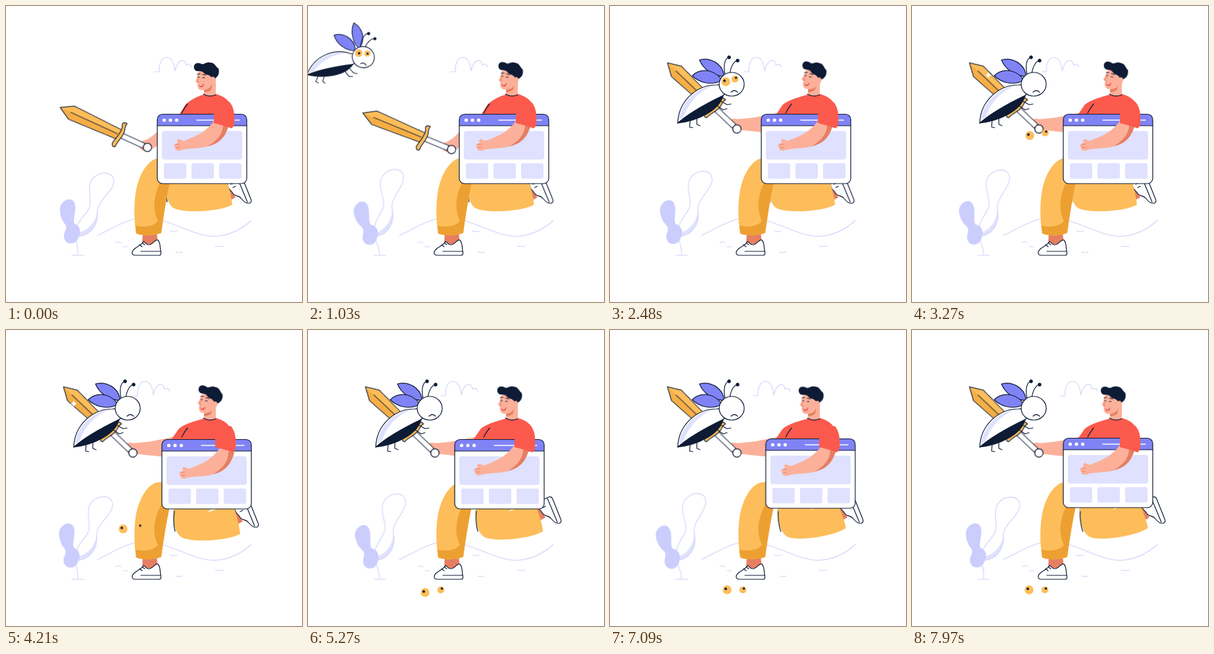
Recreate the animation shown at these times as an HTML page without scripts. Size 450 by 450 pixels, loop 8 s.

```html
<!DOCTYPE html>
<html lang="en">
<head>
<meta charset="utf-8">
<title>Bug hunter</title>
<style>
html, body { margin: 0; width: 100%; height: 100%; overflow: hidden; background: #fff; }
svg { display: block; width: 100vw; height: 100vh; }
g, path { transform-box: view-box; }

.ink { stroke: #0d1b35; stroke-width: 1.2; stroke-linecap: round; stroke-linejoin: round; }
.line { fill: none; }
.pale { fill: none; stroke: #d0d2f9; stroke-width: 1.1; stroke-linecap: round; }
.navy { fill: #0d1b35; }
.white { fill: #fff; }
.skin { fill: #fcb09a; }
.shade { fill: #e67e62; }
.red { fill: #fb5a4d; }
.gold { fill: #fdbd5a; }
.amber { fill: #eda032; }
.edge { fill: #f5ae45; }
.violet { fill: #8083f5; }
.tint { fill: #dfe1fe; }

.cloud, .bug, .wing, .stare, .sword, .arm, .torso, .head, .win, .reach, .sleeve,
.thigh, .shoe, .glint, .eye1, .eye2 { animation: 8s linear infinite; }
.head, .win, .reach, .sleeve, .thigh, .shoe { animation-timing-function: ease-in-out; }

/* plant and cloud */
.leaf, .frond { animation: 1s cubic-bezier(.37,0,.63,1) infinite alternate; transform-origin: 107px 378px; }
.leaf { animation-name: leaf; }
.frond { animation-name: frond; }
@keyframes leaf { to { transform: rotate(-10.8deg); } }
@keyframes frond { to { transform: rotate(-9.4deg); } }
.cloud { animation-name: cloud; }
@keyframes cloud {
  0%, 100% { transform: translate(226px, 100px); }
  50% { transform: translate(191px, 100px); }
}

/* bug */
.bug { animation-name: bug; }
@keyframes bug {
  0%, 2% { transform: translate(-45px, 84px) rotate(19deg) scale(.89); }
  10.6% { transform: translate(68px, 80px) rotate(17deg) scale(.89); }
  16% { transform: translate(104px, 74px) rotate(20deg) scale(.89); }
  20.5% { transform: translate(128px, 73px) rotate(18deg) scale(.89); }
  23.9% { transform: translate(141px, 77px) rotate(19deg) scale(.89); }
  26% { transform: translate(150px, 78px) rotate(16deg) scale(.92); }
  30%, 100% { transform: translate(184px, 119px); }
}
.wing { animation-name: flap; transform-origin: -12px -12px; }
@keyframes flap {
  0%, 5%, 10%, 15%, 20%, 25% { transform: rotate(0); }
  2.5%, 7.5%, 12.5%, 17.5%, 22.5%, 27% { transform: rotate(var(--open)); }
  23.9% { transform: rotate(calc(var(--open) * .85)); }
  30%, 100% { transform: rotate(0); }
}
.stare { animation-name: stare; animation-timing-function: step-end; }
@keyframes stare { 0% { opacity: 1; } 31%, 100% { opacity: 0; } }

.eye1 { animation-name: eye1; }
.eye2 { animation-name: eye2; }
@keyframes eye1 {
  0%, 30.99% { opacity: 0; transform: translate(176px, 115px); }
  31% { opacity: 1; transform: translate(176px, 115px); }
  40.9% { transform: translate(179px, 197px); }
  52.6% { transform: translate(178px, 302px); }
  61.4% { transform: translate(178px, 386px); }
  63.2% { transform: translate(178px, 403px); }
  65.9% { transform: translate(178px, 399px); }
  69%, 100% { opacity: 1; transform: translate(178px, 395px); }
}
@keyframes eye2 {
  0%, 30.99% { opacity: 0; transform: translate(190px, 111px); }
  31% { opacity: 1; transform: translate(190px, 111px); }
  40.9% { transform: translate(202.5px, 193px); }
  52.6% { transform: translate(202.5px, 299px); }
  61.4% { transform: translate(202px, 382px); }
  63.4% { transform: translate(202px, 400px); }
  65.9%, 100% { opacity: 1; transform: translate(202px, 395px); }
}

/* sword and its arm */
.sword { animation-name: sword; }
@keyframes sword {
  0% { transform: translate(215px, 215px) rotate(24.6deg); }
  23.9%, 25% { transform: translate(221px, 221px) rotate(20.5deg); animation-timing-function: ease-in-out; }
  30%, 100% { transform: translate(193px, 187px) rotate(43.6deg); }
}
.glint { animation-name: glint; }
@keyframes glint {
  0%, 37% { transform: translate(116px, 105px) scale(0); }
  40.9% { transform: translate(116px, 105px) scale(1); }
  45% { transform: translate(116px, 105px) scale(0); }
  48% { transform: translate(103px, 112px) scale(0); }
  52.6% { transform: translate(103px, 112px) scale(1); }
  57%, 100% { transform: translate(103px, 112px) scale(0); }
}
.arm { animation-name: arm; }
@keyframes arm {
  0% { d: path("M262 176L231 190C222 199 214 204 207 205C202 207 201 214 205 218C210 222 217 220 221 218L231 212L262 200Z"); }
  23.9%, 25% { d: path("M262 176L231 190C224 200 218 206 211 209C206 211 205 218 209 222C214 226 221 224 224 222L231 216L262 200Z"); animation-timing-function: ease-in-out; }
  30%, 100% { d: path("M258 162L232 167C220 170 206 171 194 172C184 169 178 175 181 180C183 186 188 189 194 188L232 192L258 192Z"); }
}
.torso { animation-name: torso; }
@keyframes torso {
  0%, 25% { d: path("M300 135C288 138 276 146 272 151L263 166L268 225L339 225L343 180C347 165 348 142 320 134Z"); }
  30%, 100% { d: path("M300 135C288 138 268 144 262 151L251 167L258 225L339 225L343 180C347 165 348 142 320 134Z"); }
}

/* hero */
.head { animation-name: head; transform-origin: 310px 132px; }
@keyframes head {
  0%, 5% { transform: rotate(0); }
  20%, 26% { transform: rotate(10deg); }
  40.9% { transform: rotate(8.5deg); }
  52.6% { transform: rotate(10deg); }
  65.9% { transform: rotate(3deg); }
  79% { transform: rotate(1.5deg); }
  100% { transform: rotate(2deg); }
}
.win { animation-name: win; }
@keyframes win {
  0%, 41% { transform: translate(0, 0); }
  53% { transform: translate(7px, 2px); animation-timing-function: ease-in; }
  65.9% { transform: translate(-7px, 2px); animation-timing-function: ease-out; }
  78.5% { transform: translate(-27.5px, -1px); }
  88% { transform: translate(7px, 1px); }
  93%, 100% { transform: translate(0, 0); }
}
.reach { animation-name: reach; }
@keyframes reach {
  0%, 41% { transform: translate(0, 0); }
  53% { transform: translate(8px, 6px); animation-timing-function: ease-in; }
  65.9% { transform: translate(-3px, 1px); animation-timing-function: ease-out; }
  78.5% { transform: translate(-10px, -7px); }
  88% { transform: translate(5px, 2px); }
  93%, 100% { transform: translate(0, 0); }
}
.sleeve { animation-name: sleeve; }
@keyframes sleeve {
  0%, 41% { transform: translate(0, 0); }
  53% { transform: translate(2px, 0); }
  65.9% { transform: translate(-2px, 0); }
  78.5% { transform: translate(-7px, 0); }
  88% { transform: translate(2px, 0); }
  93%, 100% { transform: translate(0, 0); }
}
.thigh { animation-name: thigh; transform-origin: 250px 270px; }
@keyframes thigh {
  0% { transform: translate(1px, 0) rotate(0); }
  41% { transform: translate(-1px, 0) rotate(0); }
  51% { transform: translate(13px, 8px) rotate(0); }
  65.9% { transform: translate(13px, 8px) rotate(-2.5deg); }
  78.5%, 100% { transform: translate(13px, 8px) rotate(-5.5deg); }
}
.shoe { animation-name: shoe; }
@keyframes shoe {
  0% { transform: translate(-12px, 6px); }
  41% { transform: translate(-14px, 6px); }
  52.6% { transform: translate(-1px, 6px); }
  57.5% { transform: translate(6px, 2px); }
  63%, 100% { transform: translate(0, 0); }
}
</style>
</head>
<body>
<svg viewBox="0 0 450 450" xmlns="http://www.w3.org/2000/svg">
  <!-- scenery -->
  <g class="pale">
    <path d="M139 349C166 336 186 322 210 322C250 322 285 352 320 350C345 348 362 336 373 326"/>
    <path d="M167 360q4-3 8 0M178 366h7M250 342q5 2 10 0M258 374q5 2 10 0M318 365q6 1.500 12 0M100 379h18"/>
    <path class="cloud" d="M0 0H7C6-12 11-22 18-22C27-22 30-10 31-1C33-12 39-19 44-17C47-16 47-14 48-10C52-13 55-11 56-7"/>
  </g>
  <g class="frond">
    <path class="tint" d="M107 350C125 352 141 335 139 312C136 328 128 340 107 346Z"/>
    <path class="pale" d="M105 350C125 352 141 335 139 312C139 295 164 282 164 266C163 252 145 251 134 260C123 270 128 285 128 300C128 316 106 322 105 350"/>
    <path class="pale" d="M109 378C110 366 107 357 104 345"/>
  </g>
  <g class="leaf">
    <path fill="#cbcdfd" d="M96 294C104 293 107 303 105 312C104 320 102 326 104 331C112 334 115 343 111 350C108 358 104 361 98 361C90 361 86 352 89 345C91 340 93 336 90 332C85 326 82 318 82 309C82 301 89 294 96 294Z"/>
  </g>

  <!-- legs -->
  <g class="shoe">
    <path class="shade" d="M338 264L352 270L361 285L350 291L340 287Z"/>
    <path class="white ink" d="M349 267C348 262 351 260 355 259L366 254C369 253 371 254 372 257L384 287C386 291 384 294 381 294C377 294 373 291 370 287C366 281 360 284 357 279C355 275 350 273 349 267Z"/>
    <path class="line ink" d="M364 256L379 292M354 265l4-2M357 270l4-2"/>
  </g>
  <g class="thigh">
    <path class="gold" d="M243 255C240 275 241 296 252 306C264 316 325 313 343 302C342 290 338 276 332 255Z"/>
    <path class="white" d="M292 270L304 261L326 257Z"/>
    <path class="line ink" d="M243 267C241 281 242 290 244 298"/>
  </g>
  <path class="shade" d="M208 343H229L231 362H207Z"/>
  <path class="white ink" d="M209 358C206 365 193 367 192 374C191 378 194 379 197 379H233C236 379 236 375 235 372C234 366 235 360 231 356C227 353 224 363 217 363C213 363 212 359 209 358Z"/>
  <path class="line ink" d="M205 373H235M203 363l4 3M207 360l4 3"/>
  <path class="gold" d="M228 232C212 238 201 260 197 285C194 305 195 330 198 346C210 350 226 349 236 345C238 325 243 295 249 268L300 240L290 225Z"/>
  <path class="amber" d="M249 262V268C243 295 239 325 236 345C226 349 210 350 198 346L197 334C210 337 226 335 231 326C222 310 224 285 238 262Z"/>

  <!-- body and sword -->
  <path class="arm skin" d="M262 176L231 190C222 199 214 204 207 205C202 207 201 214 205 218C210 222 217 220 221 218L231 212L262 200Z"/>
  <path class="torso red" d="M300 135C288 138 276 146 272 151L263 166L268 225L339 225L343 180C347 165 348 142 320 134Z"/>
  <path class="line ink" d="M276 149Q271 155 267 163"/>
  <g class="sword">
    <path class="gold" d="M-146 0L-127-11L-46-8V0Z"/>
    <path class="edge" d="M-146 0L-127 11L-46 8V0Z"/>
    <path class="line ink" d="M-46-8L-127-11L-146 0L-127 11L-46 8M-128 0H-50"/>
    <path class="white ink" d="M-44-4H-6V4H-44Z"/>
    <path class="gold ink" d="M-43-20C-49-21-51-17-48-13C-45-5-49 5-51 14C-52 19-48 22-45 19C-46 10-40 2-42-8C-43-13-45-16-43-20Z"/>
    <circle class="white ink" r="6.300"/>
  </g>
  <path class="glint white" d="M0-5Q1-1 5 0Q1 1 0 5Q-1 1-5 0Q-1-1 0-5Z"/>

  <!-- browser window -->
  <g class="win">
    <rect class="white" x="230" y="164.500" width="136" height="105.500" rx="8"/>
    <path class="violet" d="M230 182V172.500Q230 164.500 238 164.500H358Q366 164.500 366 172.500V182Z"/>
    <path class="line ink" d="M230 182H366"/>
    <rect class="line ink" x="230" y="164.500" width="136" height="105.500" rx="8"/>
    <g class="white">
      <circle cx="240.500" cy="173.500" r="2.600"/><circle cx="250" cy="173.500" r="2.600"/><circle cx="259.500" cy="173.500" r="2.600"/>
    </g>
    <path stroke="#fff" stroke-width="1.300" stroke-linecap="round" d="M290 173.500H355"/>
    <g class="tint">
      <rect x="237" y="190" width="122" height="43.500" rx="4"/>
      <rect x="240" y="239" width="34" height="23.500" rx="3"/>
      <rect x="282" y="239" width="34" height="23.500" rx="3"/>
      <rect x="324" y="239" width="34" height="23.500" rx="3"/>
    </g>
  </g>
  <g class="reach">
    <path class="skin" d="M318 172C305 192 288 198 273 204C268 207 264 200 261 203C258 206 264 209 259 209C255 210 254 213 257 215C257 220 262 221 267 219C275 216 290 217 300 215C320 211 333 203 339 180Z"/>
    <path class="shade" d="M306 213.500C321 210 333 203 339 180L330 178C331 194 321 205 306 213.500Z"/>
    <path class="line" stroke="#e67e62" d="M258 210h6M258 215h6"/>
  </g>
  <path class="sleeve red" d="M316 156V178C325 180 335 183 343 186Q346 184 347 179C348 165 347 155 340 146L320 148Z"/>

  <!-- head -->
  <path class="skin" d="M301 118V134Q310 139 319 134V108Z"/>
  <path class="shade" d="M301 127Q309 126 314 118L312 127Q308 131 301 131Z"/>
  <path class="line ink" d="M300 134Q310 139 319 135"/>
  <g class="head">
    <path class="skin" d="M292 100C291 106 290 110 288 115L291 117C291 123 292 128 298 128C305 128 311 125 313 119L320 106L312 94Z"/>
    <path class="navy" d="M286 95C284 87 292 85 297 88C301 90 303 85 310 86C318 86 318 92 323 95C325 102 323 107 318 110L314 113C312 106 309 105 304 104C299 102 302 99 292 99C288 99 287 97 286 95Z"/>
    <ellipse class="skin" cx="314.500" cy="112" rx="3.500" ry="4.500"/>
    <path class="line ink" stroke-width="1" d="M291 104l4-1M299 104l5 1M292 108h2M299 109h3"/>
    <path class="line" stroke="#e67e62" d="M293 109L290.500 115L294 116"/>
    <path fill="#e8473f" d="M293 120Q297 121 301 118Q300.500 123.500 296.500 123.500Q294 123.500 293 120Z"/>
    <path class="white" d="M294 120.500Q297 121 300 119Q298 122 295 121.500Z"/>
  </g>

  <!-- bug -->
  <g class="bug">
    <path class="line ink" d="M-62 53l-1 12l5 1M-52 50v11l5 2M-22 32l10 7l6-2M-15 26l9 5l6-1"/>
    <path class="white ink" d="M-81 59C-80 26-53 1-22 1C-8 0-6 8-12 18C-30 24-60 45-81 59Z"/>
    <path class="tint" d="M-79 54C-76 28-53 5-27 2C-50 11-65 29-72 50Z"/>
    <path class="navy ink" d="M-81 59C-62 42-35 28-12 17C-18 40-50 55-81 59Z"/>
    <path class="wing violet ink" style="--open:32deg" d="M-11-16C-14-30-30-42-48-37C-42-22-26-12-11-12Z"/>
    <path class="wing violet ink" style="--open:10deg" d="M-16-9C-28-24-48-24-59-13C-48-2-30 2-16-5Z"/>
    <path class="line ink" d="M-9-15C-12-28-10-38-4-41M-2-16C0-28 4-34 9-36"/>
    <circle class="navy" cx="-3" cy="-41" r="2.700"/><circle class="navy" cx="10" cy="-36" r="2.700"/>
    <ellipse class="white ink" cx="1" rx="19" ry="18"/>
    <path class="line ink" d="M0 12Q5 7 10 12"/>
    <g class="stare">
      <circle class="gold" cx="-8.500" cy="-4" r="6.500"/><circle class="navy" cx="-8" cy="-4" r="2"/>
      <circle class="gold" cx="5.600" cy="-8" r="5.200"/><circle class="navy" cx="6" cy="-8" r="1.800"/>
    </g>
  </g>
  <g class="eye1"><circle class="gold" r="6.700"/><circle class="navy" cx="-2" cy="-1.500" r="1.900"/></g>
  <g class="eye2"><circle class="gold" r="5.300"/><circle class="navy" cx="1.500" cy="-2" r="1.800"/></g>
</svg>
</body>
</html>
```
